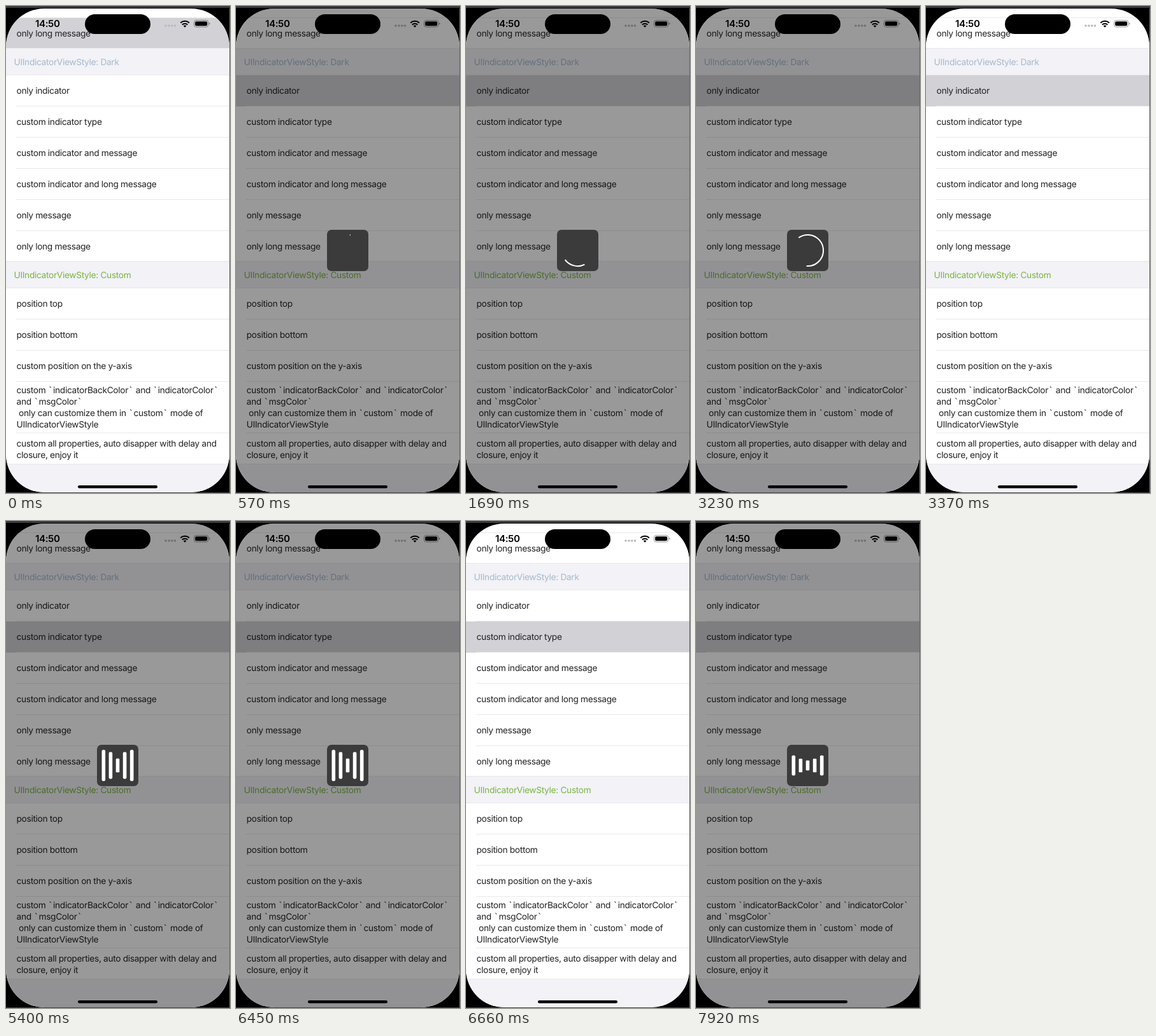
An HTML page that plays this animation: 352 by 766 pixels, repeating every 7990 ms.

```html
<!DOCTYPE html>
<html lang="en">
<head>
<meta charset="utf-8">
<title>Indicator styles</title>
<style>
  html, body { margin: 0; width: 100%; height: 100%; overflow: hidden; background: #000; }
  svg { display: block; width: 352px; height: 766px; }
  text {
    font: 400 13.7px Inter, "Open Sans", sans-serif; letter-spacing: -.31px;
    fill: #222224; white-space: pre; text-rendering: geometricPrecision;
  }
  .tick { font-family: "Noto Sans Mono", monospace; letter-spacing: 0; }
  .clock { font-size: 15px; font-weight: 600; letter-spacing: -.35px; fill: #000; }
  .band { fill: #f2f2f7; }
  .line { fill: #e8e8eb; }
</style>
</head>
<body>
<svg viewBox="0 0 352 766">
  <defs>
    <clipPath id="screen"><rect y="4" width="351" height="761" rx="60"/></clipPath>
  </defs>
  <rect width="352" height="766"/>
  <rect width="352" height="3" fill="#3c3c3e"/>
  <rect x="351" y="4" width="1" height="762" fill="#666"/>
  <rect y="765" width="352" height="1" fill="#444"/>
  <g clip-path="url(#screen)">
    <rect y="4" width="351" height="761" fill="#fff"/>
    <g id="list"></g>
    <g id="status">
      <text class="clock" x="46" y="33.3">14:50</text>
      <g fill="#b9b9bd">
        <circle cx="251" cy="31" r="1.8"/><circle cx="256" cy="31" r="1.8"/>
        <circle cx="260.800" cy="31" r="1.8"/><circle cx="265.500" cy="31" r="1.8"/>
      </g>
      <g fill="none" stroke="#000" stroke-width="2.1">
        <path d="M274.300 26.600A9.700 9.700 0 0 1 287.900 26.600"/>
        <path d="M276.900 29.400A6 6 0 0 1 285.300 29.400"/>
      </g>
      <path d="M281.100 33.800L278.700 31.300A3.500 3.500 0 0 1 283.500 31.300Z"/>
      <rect x="295.500" y="22.500" width="22.500" height="10.500" rx="3.500" fill="none" stroke="#000" stroke-opacity=".4"/>
      <rect x="297.200" y="24.200" width="19" height="7.100" rx="2.100"/>
      <path d="M319.300 26v3.600q1.500-.5 1.500-1.800t-1.500-1.800" fill-opacity=".45"/>
    </g>
    <rect x="113" y="754" width="125" height="4.400" rx="2.200"/>
    <rect id="dim" y="4" width="351" height="761" fill-opacity=".4"/>
    <rect x="124" y="13" width="103" height="31" rx="15.500"/>
    <g id="hud">
      <rect x="143" y="352" width="65" height="65" rx="7" fill="#3b3b3b"/>
      <g transform="translate(175.500 384.500)">
        <path id="arc" d="M0-24.600A24.600 24.600 0 0 1 0 24.600A24.600 24.600 0 0 1 0-24.600"
              pathLength="1" fill="none" stroke="#fff" stroke-width="2"/>
        <g id="bars" fill="#fff"></g>
      </g>
    </g>
  </g>
</svg>
<script>
const LOOP = 7990, STEP = 70, TICK = 1 / 15;
const $ = id => document.getElementById(id);

function add(parent, tag, attrs, label) {
  const el = document.createElementNS('http://www.w3.org/2000/svg', tag);
  for (const key in attrs) el.setAttribute(key, attrs[key]);
  if (label) el.textContent = label;
  return parent.appendChild(el);
}

// Backticks get the wider monospaced glyph.
function addLine(parent, attrs, line) {
  const text = add(parent, 'text', attrs);
  for (const part of line.split(/(`)/)) add(text, 'tspan', part === '`' ? { class: 'tick' } : {}, part);
}

// Table: [top, height, lines, header colour]
const rows = [
  [19, 48, ['only long message']],
  [67, 42, ['UIIndicatorViewStyle: Dark'], '#a6b8ca'],
  [109, 49, ['only indicator']],
  [158, 49, ['custom indicator type']],
  [207, 49, ['custom indicator and message']],
  [256, 49, ['custom indicator and long message']],
  [305, 49, ['only message']],
  [354, 48, ['only long message']],
  [402, 42, ['UIIndicatorViewStyle: Custom'], '#7ab441'],
  [444, 49, ['position top']],
  [493, 49, ['position bottom']],
  [542, 49, ['custom position on the y-axis']],
  [591, 81, ['custom `indicatorBackColor` and `indicatorColor`', 'and `msgColor`',
    ' only can customize them in `custom` mode of', 'UIIndicatorViewStyle']],
  [672, 50, ['custom all properties, auto disapper with delay and', 'closure, enjoy it']],
  [721, 45, [], '#000']
];
const cells = rows.map(([top, height, lines, header], i) => {
  const list = $('list');
  const cell = add(list, 'rect', { y: top, width: 351, height, class: header ? 'band' : '', fill: '#fff' });
  const nextToHeader = header || !i || rows[i - 1][3];
  const inset = nextToHeader ? 0 : 16;
  add(list, 'rect', { class: 'line', x: inset, y: top - 1, width: 351 - inset, height: 1 });
  const first = Math.floor(top + height / 2 - 9 * (lines.length - 1) + 5);
  lines.forEach((line, n) => addLine(list, {
    x: header ? 12.5 : 16.5, y: first + 18 * n,
    style: header ? `fill:${header}` : ''
  }, line));
  return cell;
});

const bars = [-2, -1, 0, 1, 2].map(n => add($('bars'), 'rect',
  { x: n * 11.1 - 2.8, y: -25, width: 5.6, height: 50, rx: 2.8 }));

const clamp = v => Math.min(1, Math.max(0, v));

function bezier(x1, y1, x2, y2) {
  const at = (u, a, b) => 3 * (1 - u) ** 2 * u * a + 3 * (1 - u) * u * u * b + u ** 3;
  return x => {
    let lo = 0, hi = 1;
    for (let i = 0; i < 24; i++) {
      const mid = (lo + hi) / 2;
      if (at(mid, x1, x2) < x) lo = mid; else hi = mid;
    }
    return at(lo, y1, y2);
  };
}

const strokeEase = bezier(.4, 0, .2, 1);

function drawArc(time) {
  const t = time % 1.7;
  const end = strokeEase(clamp(t / .7));
  const start = strokeEase(clamp((t - .5) / 1.2));
  const arc = $('arc');
  arc.setAttribute('stroke-dasharray', `${end - start} 2`);
  arc.setAttribute('stroke-dashoffset', -start);
  arc.setAttribute('transform', `rotate(${t / 1.7 * 360})`);
  arc.style.display = end - start > .001 ? '' : 'none';
}

// Bars shrink from the middle outwards, then grow back.
function pulse({ period, lag, low, turn, rest, ease }) {
  return time => bars.forEach((bar, i) => {
    const t = time - lag * Math.abs(i - 2);
    const phase = t < 0 ? 0 : t / period % 1;
    const shrink = phase < turn ? ease(phase / turn) : 1 - ease(clamp((phase - turn) / (rest - turn)));
    bar.setAttribute('transform', `scale(1 ${1 - (1 - low) * shrink})`);
  });
}

const pulseOut = pulse({ period: 1, lag: .2, low: .4, turn: .5, rest: 1, ease: bezier(.85, .25, .37, .85) });
const pulseRapid = pulse({ period: .9, lag: .25, low: .3, turn: .8, rest: .9, ease: bezier(.11, .49, .38, .78) });

const shows = [
  { from: 500, to: 3370, row: 2, draw: drawArc, shift: -.03 },
  { from: 3930, to: 6660, row: 3, draw: pulseOut, shift: .02 },
  { from: 7220, to: LOOP, row: 3, draw: pulseRapid, shift: 0 }
];

function render(now) {
  const t = now % LOOP;
  const latest = shows.filter(s => t >= s.from).pop();
  const active = latest && t < latest.to;
  const selected = latest ? latest.row : 0;
  cells.forEach((cell, i) => cell.setAttribute('fill', i === selected ? '#d1d1d6' : '#fff'));
  $('dim').style.display = $('hud').style.display = active ? '' : 'none';
  if (active) {
    const spin = latest.draw === drawArc;
    $('arc').style.display = spin ? '' : 'none';
    $('bars').style.display = spin ? 'none' : '';
    latest.draw(Math.max(0, Math.floor((t - latest.from) / STEP) * TICK + latest.shift));
  }
}

const origin = performance.now();
function frame() {
  render(performance.now() - origin);
  requestAnimationFrame(frame);
}
frame();
</script>
</body>
</html>
```
